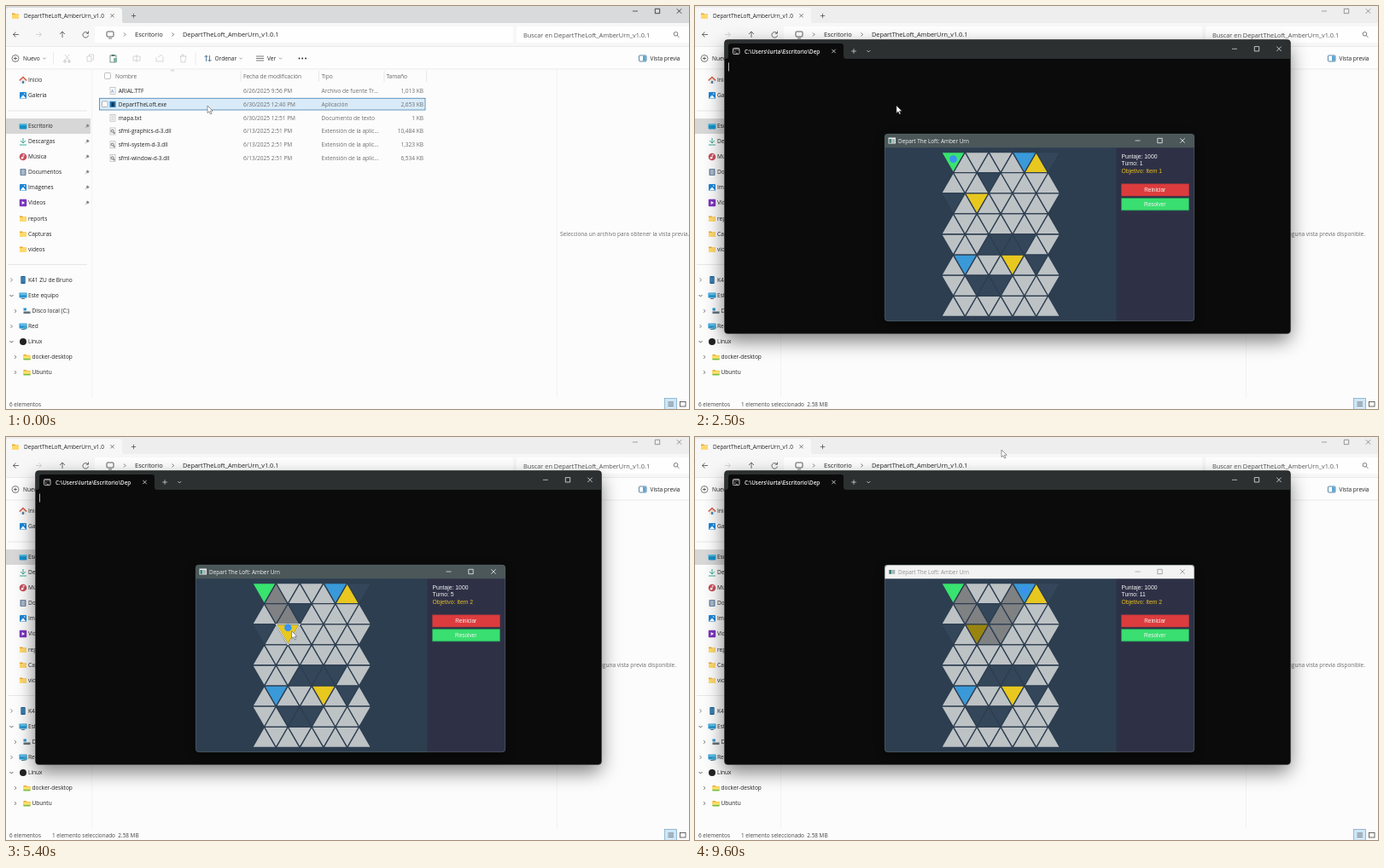
Animation of 800x473 px, one loop 9700 ms. Source, as an HTML page:

```html
<!DOCTYPE html>
<html lang="es">
<head>
<meta charset="utf-8">
<title>Depart The Loft</title>
<style>
html, body { margin: 0; width: 100%; height: 100%; overflow: hidden; background: #fcfcfc; }
svg { display: block; width: 100vw; height: 100vh; }
text { font-family: "Open Sans", "Noto Sans", sans-serif; white-space: pre; }
.game { font-family: "Liberation Sans", Arial, sans-serif; }
</style>
</head>
<body>
<svg id="stage" viewBox="0 0 800 473" preserveAspectRatio="none"></svg>
<script>
const LOOP = 9700, STEP = 100;
const APP = 'DepartTheLoft', PROJECT = APP + '_AmberUrn_v1.0';
const INK = '#222', DIM = '#6d6d6d', FAINT = '#c3c6c9';
const stage = document.getElementById('stage');
const $ = id => document.getElementById(id);

// Drawing helpers
const rect = (x, y, w, h, fill, extra = '') =>
  `<rect x="${x}" y="${y}" width="${w}" height="${h}" fill="${fill}" ${extra}/>`;
const line = (d, color = INK, width = 0.7, extra = '') =>
  `<path d="${d}" fill="none" stroke="${color}" stroke-width="${width}" ${extra}/>`;
const shape = (d, fill, extra = '') => `<path d="${d}" fill="${fill}" ${extra}/>`;
const dot = (x, y, r, fill, extra = '') => `<circle cx="${x}" cy="${y}" r="${r}" fill="${fill}" ${extra}/>`;
const text = (x, y, s, size = 6.55, fill = INK, extra = '') =>
  `<text x="${x}" y="${y}" font-size="${size}" fill="${fill}" ${extra}>${s}</text>`;
const cross = (x, y, r, c, w) => line(`M${x - r} ${y - r}l${2 * r} ${2 * r}m0 ${-2 * r}l${-2 * r} ${2 * r}`, c, w);
const plus = (x, y, r, c) => line(`M${x - r} ${y}h${2 * r}M${x} ${y - r}v${2 * r}`, c);
const right = (x, y, r, c) => line(`M${x - r / 2} ${y - r}l${r} ${r}l${-r} ${r}`, c);
const down = (x, y, r, c) => line(`M${x - r} ${y - r / 2}l${r} ${r}l${r} ${-r}`, c);
const controls = (xs, y, c) => line(`M${xs[0] - 3} ${y}h6`, c) +
  line(`M${xs[1] - 2.7} ${y - 2.7}h5.4v5.4h-5.4z`, c, 0.8) + cross(xs[2], y, 2.7, c, 0.8);

const folder = (x, y, base = '#ffd96b') =>
  shape(`M${x - 4} ${y - 3}h3l1 1h4v5h-8z`, '#e9a92c') + rect(x - 4, y - 1.4, 8, 4.6, base, 'rx=".6"');
const picture = (x, y) => rect(x - 4, y - 4, 8, 8, '#1d86d8', 'rx="1"') +
  shape(`M${x - 3.5} ${y + 3.4}l3.5 -4l3.5 4z`, '#fff') + dot(x + 1.8, y - 2, 0.8, '#fff');
const monitor = (x, y) => rect(x - 4.5, y - 3.5, 9, 6, '#2795cf', 'rx=".7"') +
  rect(x - 3.7, y - 2.8, 7.4, 2, '#62c4ec') + rect(x - 2, y + 3, 4, 1, '#68777f');
const sheet = (x, y) => rect(x - 3, y - 4, 6, 8, '#fafafa', 'stroke="#aaa" stroke-width=".6"');

const ICONS = {
  home: (x, y) => shape(`M${x - 3} ${y}v4h6v-4l-3 -3z`, '#e8e4df') +
    line(`M${x - 4.3} ${y + .4}l4.3 -4l4.3 4`, '#d4553c', 1.3) + rect(x - 1, y + 1, 2, 3, '#3f83b8'),
  picture, folder, monitor,
  desk: (x, y) => rect(x - 4.3, y - 3, 8.6, 6.4, '#1690c8', 'rx=".8"') + rect(x - 4.3, y - 3, 8.6, 2, '#4db9dd'),
  load: (x, y) => line(`M${x} ${y - 4}v6m-3 -3l3 3l3 -3M${x - 4} ${y + 4}h8`, '#22a08b', 0.9),
  music: (x, y) => dot(x, y, 4.3, '#c9505d') + dot(x - 1, y + 1.2, 1.2, '#fff') + line(`M${x + .2} ${y + 1}v-3.6l2 .6`, '#fff', .8),
  doc: (x, y) => rect(x - 3.5, y - 4, 7, 8, '#7188a5', 'rx=".7"') +
    line(`M${x - 2} ${y - 2}h4m-4 2h4m-4 2h4`, '#fff', .8),
  video: (x, y) => rect(x - 4.2, y - 4.2, 8.4, 8.4, '#7b35c0', 'rx="1"') + shape(`M${x - 1.3} ${y - 2}l3.4 2l-3.4 2z`, '#fff'),
  phone: (x, y) => rect(x - 2.7, y - 4.5, 5.4, 9, '#245f8f', 'rx=".8"') + rect(x - 2, y - 3.5, 4, 6.7, '#397fad'),
  disk: (x, y) => rect(x - 4, y + .5, 8, 2.6, '#66737b') + rect(x - 4, y - 3.5, 3.4, 3, '#2d94d1'),
  net: (x, y) => monitor(x, y) + dot(x + 2.5, y + 1.5, 2.3, '#48a6c7'),
  ball: (x, y) => dot(x, y, 4, '#222'),
  green: (x, y) => folder(x, y, '#ffe06a') + rect(x - 4, y + 1.8, 8, 1.6, '#6cc04b')
};

// Sidebar rows: icon, label, centre y, indent, marker
const SIDE = [
  ['home', 'Inicio', 87, 0], ['picture', 'Galería', 105, 0],
  ['desk', 'Escritorio', 141, 0, 'pin'], ['load', 'Descargas', 159, 0, 'pin'],
  ['music', 'Música', 177, 0, 'pin'], ['doc', 'Documentos', 195, 0, 'pin'],
  ['picture', 'Imágenes', 213, 0, 'pin'], ['video', 'Videos', 231, 0, 'pin'],
  ['folder', 'reports', 249.5, 0], ['folder', 'Capturas', 267.5, 0], ['folder', 'videos', 285.5, 0],
  ['phone', 'K41 ZU de Bruno', 321.5, 0, 'shut'], ['monitor', 'Este equipo', 340, 0, 'open'],
  ['disk', 'Disco local (C:)', 358, 4.5, 'shut'], ['net', 'Red', 376, 0, 'shut'],
  ['ball', 'Linux', 394, 0, 'open'], ['green', 'docker-desktop', 412, 4.5, 'shut'],
  ['green', 'Ubuntu', 430, 4.5, 'shut']
];
const MARKS = {
  pin: (x, y) => line(`M93 ${y + 2.2}l2 -2`, '#777') + shape(`M93.6 ${y - 1}l2 -1.6l2 2l-1.8 2z`, '#888'),
  shut: (x, y) => right(6.5 + x, y, 2, '#555'),
  open: (x, y) => down(6.5 + x, y, 2, '#222')
};
const side = ([icon, label, y, dx, mark]) => ICONS[icon](20 + dx, y) +
  text(26 + dx, y + 2.4, label) + (mark ? MARKS[mark](dx, y) : '');

const DLL = 'Extensión de la aplic...';
const FILES = [
  ['ARIAL.TTF', '6/26/2025 9:56 PM', 'Archivo de fuente Tr...', '1,013 KB'],
  [APP + '.exe', '6/30/2025 12:40 PM', 'Aplicación', '2,653 KB'],
  ['mapa.txt', '6/30/2025 12:51 PM', 'Documento de texto', '1 KB'],
  ['sfml-graphics-d-3.dll', '6/13/2025 2:51 PM', DLL, '10,484 KB'],
  ['sfml-system-d-3.dll', '6/13/2025 2:51 PM', DLL, '1,323 KB'],
  ['sfml-window-d-3.dll', '6/13/2025 2:51 PM', DLL, '6,534 KB']
];
function fileRow([name, date, type, size], i) {
  const y = 99.6 + i * 15.8;
  const icon = i === 1 ? rect(121.5, y - 3.5, 7, 7, '#1f78b8') + rect(123.5, y - 2, 3, 4.5, '#17324a')
    : sheet(125, y) + (i === 0 ? text(123, y + 2, 'A', 5, '#3975b5')
    : i === 2 ? line(`M123.3 ${y - 2}h3.4m-3.4 2h3.4m-3.4 2h3.4`, '#aaa', .6)
    : dot(124.6, y - .3, 1.5, 'none', 'stroke="#666" stroke-width="1"') + dot(126.6, y + 2, 1, '#777'));
  return icon + text(131.7, y + 2.4, name) + text(278, y + 2.4, date, 6.55, DIM) +
    text(369.5, y + 2.4, type, 6.55, DIM) + text(489, y + 2.4, size, 6.55, DIM, 'text-anchor="end"');
}

function toolbar() {
  const c = FAINT, y = 61.5;
  return dot(11, y, 4, 'none', 'stroke="#444" stroke-width=".7"') + plus(11, y, 2, '#333') +
    text(20, 64, 'Nuevo') + down(45, y, 1.6, '#777') + line('M55.5 54v15M222 54v15', '#e2e2e2') +
    line('M69 57l5 7m0 -7l-5 7', c) + dot(69, 65, 1.3, 'none', `stroke="${c}"`) + dot(74, 65, 1.3, 'none', `stroke="${c}"`) +
    line('M95 59h5v6h-5zM97.500 59v-2h5v6h-2', c) +
    rect(122, 58, 7, 8, '#fff', 'stroke="#557b70" stroke-width=".8"') + rect(123.7, 57, 3.6, 2, '#557b70') + rect(126, 61, 4, 5, '#83b5a6') +
    line('M149 59h8v5h-8zM153 57v9', c) + line('M176 60v5h8v-5M178 60l4 -2.500l2 2', c) +
    line('M203.500 59h8m-7 0l.7 7h4.600l.7 -7m-4.500 0v-2h2v2', c) +
    line('M234.500 65v-7l-2 2m2 -2l2 2M238.500 58v7l-2 -2m2 2l2 -2', '#335f88', .8) +
    text(244.5, 64, 'Ordenar') + down(275, y, 1.6, '#777') +
    line('M293 59h9m-9 2.500h9m-9 2.500h9', '#444') + text(306, 64, 'Ver') + down(321.5, y, 1.6, '#777') +
    [343.5, 347.2, 351].map(x => dot(x, y, .9, '#222')).join('') +
    rect(741.5, 58, 8.5, 7, '#fff', 'rx="1" stroke="#31688f" stroke-width=".8"') + rect(746, 58.5, 3.6, 6, '#5ca6d3') +
    text(754.5, 64, 'Vista previa');
}

function explorer() {
  return rect(0, 0, 800, 473, '#fcfcfc') +
    rect(0, 0, 800, 21, '#d8dadc', 'id="strip"') +
    shape('M0 21V5q0 -3 3 -3H132q4 0 4 4V17q0 4 4 4z', '#f7f7f7') +
    folder(11, 11.5) + text(21, 13.8, PROJECT, 6.5) + cross(124.5, 11.3, 2.1, '#444', .7) + plus(149.5, 11.5, 2.7, '#444') +
    `<g id="frameButtons">${controls([737, 763, 788.5], 6, '#222')}</g>` +
    rect(0, 20, 800, 28, '#f7f7f7') + rect(104, 24, 490, 19, '#fefefe', 'rx="2"') + rect(598, 24, 206, 19, '#fefefe', 'rx="2"') +
    line('M15 33.500h-6.500m3 -3l-3 3l3 3', '#333') + line('M35 33.500h6.500m-3 -3l3 3l-3 3', FAINT) +
    line('M66 37v-7m-3 3l3 -3l3 3', '#333') + line('M96 32a3.300 3.300 0 1 0 .5 2.500M96.500 29.500v2.700h-2.700', '#333') +
    rect(118, 30, 8, 6, 'none', 'rx="1" stroke="#333" stroke-width=".8"') + line('M120 38h4', '#333') +
    right(139, 33.5, 2, '#444') + text(151, 36.3, 'Escritorio', 7.45) + right(195.5, 33.5, 2, '#444') +
    text(207, 36.3, PROJECT + '.1', 7.35) + text(606, 36.8, `Buscar en ${PROJECT}.1`, 7.35, '#555') +
    dot(784.5, 32.8, 2.3, 'none', 'stroke="#444" stroke-width=".7"') + line('M786.200 34.600l2.300 2.300', '#444') +
    rect(0, 48, 800, 26, '#fdfdfd') + line('M0 47.500H800M0 74H800', '#e4e4e4') + toolbar() +
    line('M100.500 75V460M645.500 75V460', '#efefef') + line('M2 123H95M2 303.500H95', '#dedede') +
    rect(0, 132, 99, 18, '#d7d7d7') + SIDE.map(side).join('') +
    rect(115.5, 78.5, 7, 7, '#fff', 'rx="1" stroke="#999" stroke-width=".6"') +
    line('M193 76.500l2 -1.700l2 1.700', '#999', .6) + line('M275 76v13M366.500 76v13M443 76v13M492.500 76v13', '#e0e0e0') +
    ['Nombre,128', 'Fecha de modificación,278', 'Tipo,369.5', 'Tamaño,445.5'].map(s => {
      const [label, x] = s.split(',');
      return text(x, 84.6, label, 6.55, '#666');
    }).join('') +
    rect(109.5, 108.3, 381.5, 13.7, '#d9ebf8', 'stroke="#477fae" stroke-width=".8"') +
    rect(112.5, 112, 6.5, 6.5, '#fff', 'rx="1" stroke="#888" stroke-width=".6"') + FILES.map(fileRow).join('') +
    text(649, 270, 'Selecciona un archivo para obtener la vista previa.', 6.53, DIM, 'id="hint"') +
    text(785, 270, 'No hay ninguna vista previa disponible.', 6.53, DIM, 'id="noPreview" text-anchor="end"') +
    text(4, 470, '6 elementos', 6.45, '#444') +
    text(54, 470, '1 elemento seleccionado  2.58 MB', 6.4, '#444', 'id="picked"') +
    rect(771.5, 460.5, 14, 13, '#cfe6f5', 'stroke="#6fa5c9" stroke-width=".7"') +
    line('M775.500 465h6.500m-6.500 2.200h6.500m-6.500 2.200h6.500', '#444') + rect(789.5, 464.5, 6.5, 5.5, 'none', 'stroke="#444" stroke-width=".8"');
}

function terminal() {
  const c = '#e8e8e8';
  return rect(34, 48, 663, 345, '#000', 'rx="8" opacity=".5" filter="url(#blur)"') +
    rect(34.5, 39.5, 663, 345, '#0b0b0b', 'rx="4" stroke="#3b3e3e" stroke-width=".7"') +
    shape('M34.800 62V44q0 -4 4 -4H693q4 0 4 4V62z', '#2c3030') +
    shape('M36 62q3 0 3 -3V47q0 -3 3 -3H171q3 0 3 3V59q0 3 3 3z', '#0b0b0b') +
    rect(44.5, 49.5, 7.5, 7, '#111', 'rx="1" stroke="#ddd" stroke-width=".8"') + line('M44.500 51h7.500M46 53l1.300 1l-1.300 1m2 .3h2', '#ddd', .6) +
    `<g clip-path="url(#tabClip)">${text(58, 55.5, 'C:\\Users\\lurta\\Escritorio\\Dep', 6.3, '#f4f4f4', 'font-weight="600"')}</g>` +
    cross(162.5, 53, 2.2, c, .8) + plus(186, 53, 2.8, c) + down(203.3, 53, 2, c) + controls([632, 658, 684], 50.3, c) +
    rect(39, 66.5, .8, 10, '#ddd', 'id="caret"');
}

// Board of alternating triangles
const ROWS = 8, COLS = 9, HALF = 13.9, TALL = 24.1, X0 = 302.5, Y0 = 171.6;
const HOLES = new Set(['0,8', '1,3', '2,0', '4,3', '4,4', '4,5', '4,6', '5,7', '6,2', '6,3', '6,4']);
const SPECIAL = { '0,0': '#38e36f', '0,6': '#3a99d8', '0,7': '#e8c81e', '2,2': '#e8c81e', '5,1': '#3a99d8', '5,5': '#e8c81e' };
const ROUTE = ['0,0', '0,1', '1,1', '1,2', '2,2', '2,3', '2,4', '1,4', '1,5', '0,5', '0,6'];
const CLICKS = [0, 3900, 4400, 4800, 5250, 5700, 6100, 6500, 6950, 7400, 7780];
const pointsUp = (r, c) => (r + c) % 2 === 1;
const middle = key => {
  const [r, c] = key.split(',').map(Number);
  return [X0 + c * HALF, Y0 + (r + (pointsUp(r, c) ? 2 / 3 : 1 / 3)) * TALL];
};
function triangle(r, c) {
  const x = X0 + c * HALF, top = Y0 + r * TALL, up = pointsUp(r, c);
  const base = up ? top + TALL : top, tip = up ? top : top + TALL;
  return `M${x - HALF} ${base}H${x + HALF}L${x} ${tip}z`;
}
const cells = [];
for (let r = 0; r < ROWS; r++) for (let c = 0; c < COLS; c++) {
  const key = r + ',' + c, hole = HOLES.has(key);
  cells.push({ r, c, key, hole, color: hole ? '#34475a' : SPECIAL[key] || '#bdc2c5' });
}
const cellAt = (x, y) => cells.find(({ r, c, hole }) => {
  const v = (y - Y0) / TALL - r;
  return !hole && v >= 0 && v < 1 && Math.abs(x - X0 - c * HALF) < HALF * (pointsUp(r, c) ? v : 1 - v);
});

function game() {
  const button = (y, fill, edge, label) =>
    rect(499.5, y, 79, 14.2, fill, `stroke="${edge}" stroke-width=".9" stroke-dasharray="2 1"`) +
    text(538.7, y + 9.3, label, 6.4, '#f4f4f4', 'class="game" text-anchor="middle"');
  return rect(224, 156, 359, 216, '#000', 'rx="5" opacity=".55" filter="url(#blurSmall)"') +
    `<g clip-path="url(#gameClip)">` + rect(222, 150, 363, 220, '#2d3e50') + rect(493.5, 166, 92, 204, '#2e3146') +
    rect(222, 150, 363, 16.3, '#4b5759', 'id="gameBar"') + '</g>' +
    rect(222.3, 150.3, 362.4, 219.4, 'none', 'rx="4" stroke="#566365" stroke-width=".6"') +
    rect(226.5, 154.5, 8.5, 7, '#f0f0f0') + rect(227.3, 156, 3, 4.8, '#3b8175') + rect(231, 156, 3.2, 4.8, '#a5b3b3') +
    `<g id="gameHead">${text(238, 160.7, 'Depart The Loft: Amber Urn', 6.4, 'currentColor')}${controls([518.5, 544.5, 571], 158, 'currentColor')}</g>` +
    cells.map(k => `<path id="c${k.key}" d="${triangle(k.r, k.c)}" stroke="#2d3e50" stroke-width="1.3"/>`).join('') +
    line('', '#eef1f3', 1.1, 'id="hover"') + dot(0, 0, 4.3, '#3a92f2', 'id="player"') +
    text(499.5, 178.8, 'Puntaje: 1000', 6.8, '#f4f4f4', 'class="game"') +
    text(499.5, 187.2, '', 6.8, '#f4f4f4', 'class="game" id="turn"') +
    text(499.5, 195.7, '', 6.8, '#e5bd20', 'class="game" id="goal"') +
    button(208.8, '#dc3c3d', '#a8363c', 'Reiniciar') + button(225.6, '#39df70', '#249a59', 'Resolver');
}

stage.innerHTML = `<defs>
  <filter id="blur" x="-15%" y="-20%" width="130%" height="150%"><feGaussianBlur stdDeviation="11"/></filter>
  <filter id="blurSmall" x="-15%" y="-20%" width="130%" height="150%"><feGaussianBlur stdDeviation="7"/></filter>
  <clipPath id="tabClip"><rect x="57" y="45" width="95" height="16"/></clipPath>
  <clipPath id="gameClip"><rect x="222" y="150" width="363" height="220" rx="4"/></clipPath>
</defs>${explorer()}<g id="terminal">${terminal()}</g><g id="game">${game()}</g>
<path id="pointer" d="M0 0v8.600l2 -1.800l1.500 3.200l1.400 -.6l-1.500 -3.200h2.800z" fill="#fff" stroke="#555" stroke-width=".6"/>`;

const MOUSE = [
  [0, 236, 117], [3200, 236, 117], [3800, 318, 186], [4200, 318, 187], [4400, 322, 201],
  [4800, 331, 212], [5250, 331, 225], [5700, 345, 236], [6100, 358, 227], [6300, 362, 218],
  [6500, 360, 212], [6950, 373, 203], [7400, 374, 190], [7700, 391, 182], [8000, 391, 182],
  [9200, 360, 11], [9400, 359, 15], [LOOP, 359, 15]
];
const clamp = v => Math.max(0, Math.min(1, v));
const mix = (a, b, p) => a + (b - a) * p;
function mouseAt(t) {
  const i = MOUSE.findIndex(k => k[0] > t);
  const [a, b] = [MOUSE[i - 1], MOUSE[i]];
  const p = (t - a[0]) / (b[0] - a[0]), e = p * p * (3 - 2 * p);
  return [mix(a[1], b[1], e), mix(a[2], b[2], e)];
}
const set = (id, name, value) => $(id).setAttribute(name, value);
const show = (id, on) => set(id, 'visibility', on ? 'inherit' : 'hidden');
const grow = (id, s, x, y) => set(id, 'transform', `translate(${x} ${y}) scale(${s}) translate(${-x} ${-y})`);

function render(t) {
  const picked = t >= 200, focused = t < 500;
  show('hint', !picked);
  show('noPreview', picked);
  show('picked', picked);
  set('strip', 'fill', focused ? '#d8dadc' : '#eeeeef');
  set('frameButtons', 'opacity', focused ? 1 : 0.55);

  show('terminal', t >= 1000);
  grow('terminal', mix(0.964, 1, 1 - (1 - clamp((t - 1000) / 200)) ** 2), 365.5, 211.5);
  show('caret', t >= 1200 && (t - 100) % 1060 < 530);

  const open = clamp((t - 1300) / 300);
  show('game', open > 0);
  set('game', 'opacity', open);
  grow('game', mix(0.92, 1, open), 403.5, 260);
  const away = t >= 9500;
  set('gameBar', 'fill', away ? '#f3f3f3' : '#4b5759');
  set('gameHead', 'color', away ? '#929292' : '#f4f4f4');

  const at = CLICKS.filter(c => c <= t).length - 1;
  const been = ROUTE.slice(1, Math.max(1, at));
  for (const k of cells) {
    const used = been.includes(k.key);
    set('c' + k.key, 'fill', !used ? k.color : SPECIAL[k.key] ? '#99840f' : '#7f8183');
  }
  const from = middle(ROUTE[Math.max(0, at - 1)]), to = middle(ROUTE[at]), p = clamp((t - CLICKS[at]) / 200);
  set('player', 'cx', mix(from[0], to[0], p));
  set('player', 'cy', mix(from[1], to[1], p));
  $('turn').textContent = 'Turno: ' + (at + 1);
  $('goal').textContent = 'Objetivo: Item ' + (at >= 4 ? 2 : 1);

  const [x, y] = mouseAt(t), over = cellAt(x, y);
  set('hover', 'd', over ? triangle(over.r, over.c) : '');
  set('pointer', 'transform', `translate(${x} ${y})`);
}

function tick() {
  render(Math.floor(performance.now() % LOOP / STEP) * STEP);
  requestAnimationFrame(tick);
}
tick();
</script>
</body>
</html>
```
